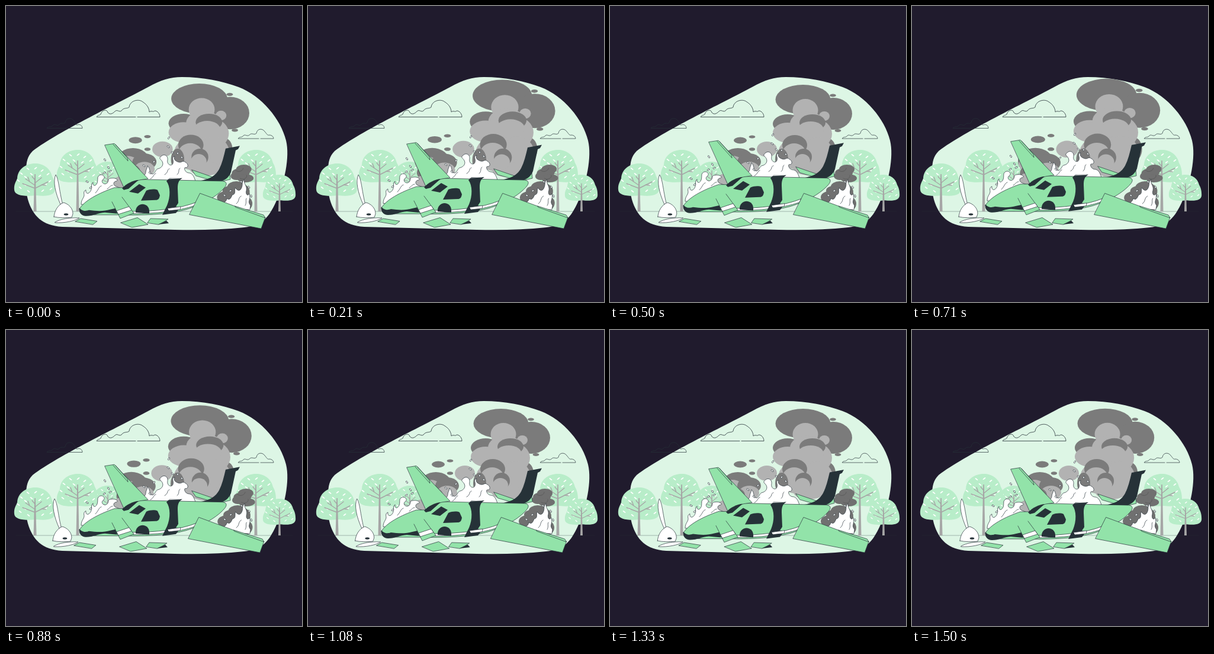
These frames come from a looping animation (500x500 px, 1540 ms). An HTML page with a canvas:

```html
<!DOCTYPE html>
<html lang="en">
<head>
<meta charset="utf-8">
<title>Crashed plane</title>
<style>
html, body { margin: 0; width: 100%; height: 100%; overflow: hidden; background: #201b2d; }
canvas { display: block; width: 500px; height: 500px; }
</style>
</head>
<body>
<canvas id="stage"></canvas>
<script>
const LOOP = 1540;
const INK = '#263238', GREEN = '#92e3a9', PALE = '#ddf6e5', LEAF = '#b8edc9';
const DARK = '#7b7b7b', LIGHT = '#b2b2b2', SOOT = '#707070', WHITE = '#fff';

const canvas = document.getElementById('stage');
const ctx = canvas.getContext('2d');
const ratio = window.devicePixelRatio || 1;
canvas.width = canvas.height = 500 * ratio;

function shape(d, fill, stroke, width = 0.7) {
  const path = new Path2D(d);
  if (fill) { ctx.fillStyle = fill; ctx.fill(path); }
  if (stroke) { ctx.strokeStyle = stroke; ctx.lineWidth = width; ctx.stroke(path); }
}

function oval(x, y, rx, ry, fill, stroke, turn = 0) {
  ctx.beginPath();
  ctx.ellipse(x, y, rx, ry, turn, 0, Math.PI * 2);
  ctx.fillStyle = fill;
  ctx.fill();
  if (stroke) { ctx.strokeStyle = stroke; ctx.lineWidth = 0.7; ctx.stroke(); }
}

function group(transform, draw) {
  ctx.save();
  ctx.transform(...transform);
  draw();
  ctx.restore();
}

const shift = (x, y, draw) => group([1, 0, 0, 1, x, y], draw);

// Eased interpolation through [time, value] keys.
function track(keys, t) {
  let i = 1;
  while (i < keys.length - 1 && t > keys[i][0]) i++;
  const [t0, v0] = keys[i - 1], [t1, v1] = keys[i];
  const p = Math.min(1, Math.max(0, (t - t0) / (t1 - t0)));
  return v0 + (v1 - v0) * (1 - Math.cos(p * Math.PI)) / 2;
}

const pulseKeys = [[0, 0.2], [70, 0.12], [285, 1.12], [500, 0], [715, 1.02], [1080, 0], [1490, 0], [LOOP, 0.2]];
const driftKeys = [[0, 0], [270, 1.2], [790, -2.2], [1200, -1.1], [LOOP, 0]];

function drawGround() {
  shape('M45 245C90 211 190 164 240 137C262 125 277 120 297 120C332 120 367 127 393 137C432 152 464 191 473 227C480 255 470 300 456 331C444 357 433 371 402 374C365 378 325 379 285 378L95 373C61 371 45 354 37 327C32 309 33 293 34 279C34 264 36 254 45 245Z', PALE);
  shape('M17 347H484', null, '#26323890', 0.6);
}

function drawClouds() {
  shape('M219 187.5H153C155 184 158 185 160 183C162 175 171 174 172 180C176 184 180 182 184 178C188 174 191 180 195 177C199 171 204 174 208 171C209 160 224 156 231 162C238 166 242 173 242 179C246 176 249 180 251 177C256 177 260 182 260 187.5H222', null, INK, 0.8);
  shape('M104 206.5H69C72 202 76 206 80 201C83 198 86 204 90 200C94 196 97 200 100 197C101 189 110 188 114 193C117 196 117 201 120 201C125 199 129 202 129 206.5H107', null, INK, 0.7);
  shape('M427 224H392C395 220 398 223 401 219C404 216 407 221 411 218C415 213 419 219 423 215C424 207 433 206 437 212C440 215 441 219 445 218C449 218 452 221 452 224H430', null, INK, 0.7);
}

// Tree in local units: trunk at x = 0, crown top at y = 0.
function drawTree(x, top, size, foot) {
  group([size, 0, 0, size, x, top], () => {
    shape('M-35 45C-36 35 -32 31 -30 25C-29 9 -15 0 0 0C14 0 26 8 29 22C32 27 34 33 34 43C34 54 20 56 3 54C-15 56 -34 55 -35 45Z', LEAF);
    const flecks = [[-23, 17], [-12, 9], [1, 8], [12, 12], [22, 18], [-28, 29], [-16, 23], [-6, 18],
      [8, 21], [25, 30], [-25, 41], [-17, 36], [-11, 47], [18, 36], [13, 46], [27, 43]];
    for (const [fx, fy] of flecks) {
      oval(fx, fy, 3, 0.9, WHITE, null, fx < 0 ? 0.65 : -0.65);
    }
    const end = (foot - top) / size;
    shape(`M-2.5 ${end}L-0.8 18L0.8 18L2.5 ${end}Z`, '#a6a6a6');
    shape('M0 37L-16 26M0 42L-21 34M0 33L11 24M0 42L22 31M-9 31L-12 23M11 36L18 37M0 28L-5 22', null, '#a6a6a6', 1.4);
  });
}

function drawTrees() {
  drawTree(172, 263, 0.82, 347);
  drawTree(49, 266, 1, 347);
  drawTree(121, 243, 1, 347);
  drawTree(422, 243, 1, 347);
  drawTree(462, 285, 0.8, 347);
}

function drawSmoke(pulse) {
  const s = 1 + 0.09 * pulse;
  group([s, 0, 0, s, 298 * (1 - s), 244 * (1 - s)], () => {
    const puffs = [
      [326, 158, 46.5, 25, DARK], [377, 182, 32, 27, DARK], [300, 199, 25, 16, DARK],
      [369, 242, 12, 18, DARK], [330, 176, 21.5, 19, LIGHT], [300, 214, 25, 17, LIGHT],
      [347, 216, 28, 25, LIGHT], [333, 199, 29, 21, LIGHT], [362, 186, 9, 8, LIGHT],
      [265, 242, 17, 13, LIGHT], [318, 249, 34, 28, LIGHT], [350, 248, 26, 26, LIGHT],
      [336, 274, 26, 12, LIGHT], [342, 197, 22, 14, DARK], [339, 209, 22, 14, LIGHT],
      [312, 235, 21, 17, DARK], [311, 247, 19, 15, LIGHT], [327, 255, 14, 14, DARK],
      [325, 262, 13, 12, LIGHT], [290, 259, 11, 18, DARK],
      [216, 261, 27, 21, DARK], [207, 265, 17, 12, LIGHT], [235, 263, 20, 14, DARK],
      [235, 275, 17, 12, LIGHT], [210, 279, 18, 13, DARK],
      [220, 227, 11, 5.4, DARK], [240, 221, 5.4, 2.6, DARK], [240, 242, 5.2, 2.7, DARK],
      [376.5, 151, 5.3, 2.6, DARK], [385, 210.5, 5.3, 2.6, DARK]
    ];
    for (const [x, y, rx, ry, tone] of puffs) oval(x, y, rx, ry, tone);
  });
}

function drawDrops(drops) {
  for (const [x, y, turn] of drops) oval(x, y, 2.2, 1.2, WHITE, INK, turn);
}

function drawFlames() {
  oval(191, 299, 9, 10, LIGHT);
  shape('M127 335C127 326 132 325 132 319C131 315 132 312 135 311C134 316 138 319 142 314C147 308 142 302 147 298C146 304 151 306 154 299C156 293 153 289 158 286C164 283 169 290 164 293C159 297 166 304 171 299C174 296 171 291 178 291C186 290 190 294 187 296C181 296 180 303 186 305L197 309L190 335Z', WHITE, INK);
  shape('M151 316C157 310 156 306 161 304M171 309C175 307 176 303 180 303', null, INK);
  drawDrops([[167, 260, 1], [166, 282, -0.7], [137, 297, 0.5], [143, 307, -0.6], [176, 279, -0.5], [173, 273, 1]]);

  shape('M228 296C230 287 236 286 236 281C236 277 239 274 239 270C245 276 241 283 247 284C253 283 252 276 257 275C262 274 267 269 264 263C262 259 257 258 262 254C267 249 274 253 273 260C271 268 280 272 282 266C284 260 278 256 285 254C282 260 288 263 292 264C298 265 298 260 303 264C309 267 308 274 303 273C300 273 302 281 308 282C313 282 317 285 320 296Z', WHITE, INK);
  shape('M244 292C250 289 249 284 253 283M268 285C275 281 271 277 276 275M289 285C294 281 290 277 294 274', null, INK);
  drawDrops([[275, 223, -1], [274, 238, 0.7], [281, 248, 0.8], [290, 249, -1.1], [233, 270, 0.7], [250, 263, -0.8], [243, 282, 0.8], [297, 256, 0.7]]);
}

function drawPlane() {
  shape('M314 277L352 290L345 294L321 287Z', GREEN, INK);
  shape('M362 292L378 283L379 293L362 297Z', GREEN, INK);
  shape('M318 297C340 294 352 290 360 276C365 266 368 254 371 241L395 236.5L392 242L388 244L380 281C377 289 371 294 362 297Z', INK);

  shape('M124 343C132 329 157 316 183 307L197 307C207 298 216 294 226 293L366 296C373 297 374 301 369 307C357 321 334 335 304 344C271 353 229 354 190 353L147 353C138 355 127 353 124 343Z', GREEN, INK);
  shape('M213 347C252 347 294 343 323 331L320 337C291 347 251 351 215 351Z', WHITE, INK);
  shape('M124 341C128 347 135 347 140 345C154 347 166 347 176 344L185 342L188 351L167 349C155 350 147 355 135 355C128 355 122 349 124 341Z', INK);

  shape('M167 235L183 232.5L240 292L226 294L211 299L199 306Z', GREEN, INK);
  shape('M181 234L206 262L205 257L185 234', null, INK);

  shape('M196 308C204 300 214 295 224 294L207 309L199 311Z', INK);
  shape('M208 314L225 301L236 307L223 317Z', INK);
  shape('M228 329L237 312C244 309 252 309 256 311L260 320C259 326 257 328 253 328Z', INK);

  shape('M179 331L198 325L216 350L193 359Z', GREEN);
  shape('M183 306M179 331L193 359L216 350L196 323', null, INK);
  shape('M187 346L208 339L212 345L190 352Z', WHITE, INK);

  shape('M219 349C218 341 224 335 231 335C239 336 243 341 242 351Z', INK);
  shape('M271 296L276 291L298 291C291 295 290 300 290 309L291 333L287 339L295 340L287 350L264 353L272 337C278 323 278 305 271 296Z', INK);
  shape('M273 342L295 339L294 344L275 346Z', WHITE, INK);
  shape('M275 292L294 291', null, WHITE, 0.8);
}

function drawRightFire(pulse) {
  const skew = -0.13 * pulse;
  group([1, 0, skew, 1, -340 * skew, 0], () => {
    const puffs = [[400, 276, 13, 8], [395, 282, 15, 8], [388, 287, 10, 7], [403, 291, 14, 7],
      [388, 305, 15, 9], [377, 312, 12, 8], [370, 323, 14, 10], [404, 334, 12, 12], [398, 315, 13, 14]];
    for (const [x, y, rx, ry] of puffs) oval(x, y, rx, ry, SOOT);
    shape('M386 277C390 282 399 279 399 274M394 291C400 295 407 290 405 286', null, '#505050', 0.6);
  });
  const sway = -0.04 * pulse;
  group([1, 0, sway, 1, -340 * sway, 0], () => {
    shape('M364 341C364 331 372 333 373 325C378 329 380 324 382 319C389 318 385 311 387 307C391 313 396 313 398 306C400 301 397 298 402 293C401 301 407 303 406 311C404 318 408 322 411 317C414 328 407 329 413 337L412 344Z', WHITE, INK);
    shape('M389 334C395 329 391 325 397 321M404 337C407 332 404 328 406 325', null, INK);
    drawDrops([[369, 320, 0.7], [379, 312, -0.7], [397, 297, 0.8], [410, 306, 1], [414, 321, 1.3]]);
  });
}

function drawDebris() {
  shape('M328 316.5L438 357L431 376L310 352.5Z', GREEN, INK);
  shape('M387 338L435 353L438 358L388 340Z', GREEN, INK);

  shape('M117 364L126 359L154 363.5L147 369Z', GREEN, INK);
  shape('M194 366L222 357.5L240 369L213 374Z', GREEN, INK);
  shape('M239 366L244 359L274 360L266 365L258 369Z', GREEN, INK);
  shape('M257 369L271 362.5L275 367Z', INK);

  shape('M92 335C83 315 79 296 84 285C89 292 90 312 95 332Z', WHITE, INK);
  shape('M81 356C82 345 88 336 97 332C105 334 113 341 113 351L111 357C101 358 89 358 81 356Z', WHITE, INK);
  oval(101.5, 352, 3.8, 1.7, INK);
  shape('M83 365C91 360 108 357 124 358C117 363 99 367 83 366Z', WHITE, INK);
}

function render() {
  const t = performance.now() % LOOP;
  const pulse = track(pulseKeys, t);
  const lift = -3.1 * (1 + Math.cos(2 * Math.PI * (t - 690) / LOOP));

  ctx.setTransform(ratio, 0, 0, ratio, 0, 0);
  ctx.lineJoin = ctx.lineCap = 'round';
  ctx.fillStyle = '#201b2d';
  ctx.fillRect(0, 0, 500, 500);

  drawGround();
  drawClouds();
  drawTrees();
  drawSmoke(pulse);
  shift(0, lift, drawFlames);
  drawRightFire(pulse);
  shift(0, lift, drawPlane);
  shift(track(driftKeys, t), 0, drawDebris);
  requestAnimationFrame(render);
}
render();
</script>
</body>
</html>
```
